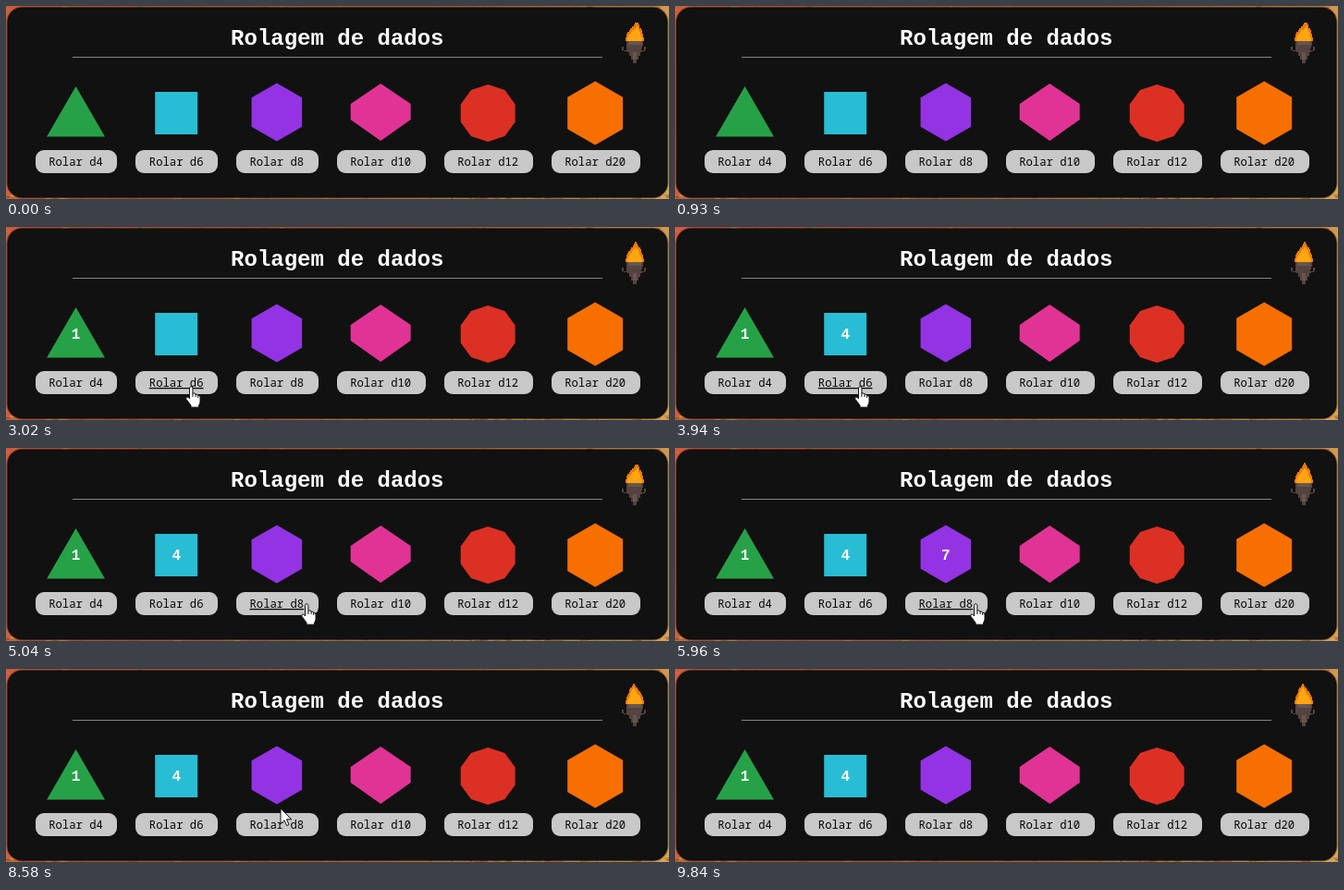
Write an HTML page that moves like this. It is 717 by 209 pixels and loops after 9900 ms.

```html
<!DOCTYPE html>
<html lang="pt-BR">
<head>
<meta charset="utf-8">
<title>Rolagem de dados</title>
<style>
  html, body { margin: 0; width: 100%; height: 100%; overflow: hidden; background: #c0583a; }
  svg { display: block; width: 717px; height: 209px; }
  text { text-anchor: middle; }
  .title, .digit { font-family: "Liberation Mono", "Courier New", monospace; font-weight: 700; fill: #fff; }
  .title { font-size: 24px; }
  .digit { font-size: 16px; }
  .label { font: 500 12.22px "Noto Sans Mono", "DejaVu Sans Mono", monospace; fill: #050505; }
  .pixel { shape-rendering: crispEdges; }
</style>
</head>
<body>
<svg viewBox="0 0 717 209">
  <defs>
    <linearGradient id="wall" x2="1" y2=".3">
      <stop offset="0" stop-color="#cf5b3e"/>
      <stop offset=".6" stop-color="#c56a3c"/>
      <stop offset="1" stop-color="#d8a356"/>
    </linearGradient>
  </defs>
  <rect width="717" height="209" fill="url(#wall)"/>
  <g id="grain"></g>
  <rect x="1.5" y="1.5" width="714" height="206" rx="16" fill="#111" stroke="#000" stroke-opacity=".35" stroke-width="2"/>
  <text class="title" x="358.3" y="42">Rolagem de dados</text>
  <path class="pixel" d="M72 55.5H645" stroke="#858585"/>
  <g id="dice"></g>
  <g class="pixel">
    <path d="M671 38h18v4l-2 6h3v-4h2v4l-6 2v4h-2v4h-2v4h-4v-4h-2v-4h-2v-4l-8-2v-4h2v4h3z" fill="#54433f"/>
    <path d="M673 38h14v4h-14zM678 50h4v8h-4z" fill="#68554f"/>
    <path id="flame" fill="#ec7a0a"/>
    <path id="core" fill="#ffa512"/>
  </g>
  <g id="cursor" stroke="#111" stroke-linejoin="round" fill="#fff">
    <path id="hand" transform="translate(-6 -1)" d="M4.5 14V2.5a1.7 1.7 0 0 1 3.4 0V8q3-.6 3.2 1.2 2.2-.4 2.6 1 2.3-.2 2.3 2v5q0 2-1.5 4v2H6v-2L1 14.5q-1-2.2 1-2.6 1 0 2.5 2ZM7.9 8v4M11.1 9v3M13.7 10v3"/>
    <path id="arrow" d="M0 0V16.5L4 12.8L6.6 18.6L9 17.5L6.5 11.8H11.8Z"/>
  </g>
</svg>
<script>
const LOOP = 9900, FADE = 300, FLICKER = 104;
const $ = id => document.getElementById(id);
const clamp = v => Math.min(1, Math.max(0, v));
const smooth = v => v * v * (3 - 2 * v);

function add(parent, tag, attrs, text = "") {
  const node = document.createElementNS("http://www.w3.org/2000/svg", tag);
  for (const key in attrs) node.setAttribute(key, attrs[key]);
  node.textContent = text;
  parent.append(node);
  return node;
}

// Speckled wall that shows around the panel
let seed = 7;
const random = () => (seed = seed * 16807 % 2147483647) / 2147483647;
for (let i = 0; i < 260; i++) {
  add($("grain"), "rect", {
    x: random() * 717, y: (i % 2) * 204 + random() * 4,
    width: 2 + random() * 8, height: 1 + random(),
    fill: `hsl(${8 + random() * 34} 58% ${34 + random() * 28}%)`, opacity: .7
  });
}

const ring = (n, r, turn = 0) => Array.from({ length: n }, (_, i) => {
  const a = (i + turn) / n * 2 * Math.PI;
  return [r * Math.sin(a), -r * Math.cos(a)];
}).join(" ");

// show / hide: when the result starts to fade in and out
const dice = [
  { sides: 4, color: "#26a148", shape: ring(3, 36.3), y: 123.3, value: 1, show: 2100 },
  { sides: 6, color: "#28bdd4", shape: ring(4, 32.5, .5), y: 116, value: 4, show: 3600 },
  { sides: 8, color: "#9333e4", shape: ring(6, 31.5), y: 115, value: 7, show: 5380, hide: 8050 },
  { sides: 10, color: "#e13396", shape: "0,-31 32.5,-9 32.5,8 0,31 -32.5,8 -32.5,-9", y: 115 },
  { sides: 12, color: "#dc3025", shape: ring(10, 31), y: 116 },
  { sides: 20, color: "#f66f00", shape: ring(6, 34.6), y: 116 }
];
let left = 31.6;
for (const die of dice) {
  const width = die.sides < 10 ? 88.66 : 96;
  const x = Math.round(left), right = Math.round(left + width);
  const mid = left + width / 2 - .4;
  add($("dice"), "polygon", { points: die.shape, fill: die.color, transform: `translate(${mid} ${die.y})` });
  if (die.value) die.digit = add($("dice"), "text", { class: "digit", x: mid, y: 121 }, die.value);
  add($("dice"), "rect", { x, y: 156, width: right - x, height: 25, rx: 9, fill: "#c8c8c8" });
  die.label = add($("dice"), "text", { class: "label", x: mid, y: 173 }, `Rolar d${die.sides}`);
  Object.assign(die, { x, right, mid });
  left += width + 20;
}

// Pointer visits: leaves the last spot at start, rests at x, y from end
const entry = { x: 142, y: 218 };
const moves = [
  { start: 860, end: 1470, x: 91, y: 169 },
  { start: 2560, end: 3020, x: 200, y: 173 },
  { start: 4110, end: 4420, x: 325, y: 169 },
  { start: 6110, end: 6890, x: 294, y: 119 },
  { start: 8300, end: 9040, x: 304, y: 218 }
];

function pointer(t) {
  let { x, y } = entry;
  for (const move of moves) {
    const p = smooth(clamp((t - move.start) / (move.end - move.start)));
    x += (move.x - x) * p;
    y += (move.y - y) * p;
  }
  return [Math.round(x), Math.round(y)];
}

// Teardrop in two-pixel rows whose tip leans sideways
function teardrop(width, height, lean) {
  let d = "";
  for (let rise = 0; rise < height; rise += 2) {
    const u = rise / height;
    const half = Math.max(1, Math.round(width * (1 - u ** 1.6)));
    const x = Math.round(680 + lean * u * u) - half;
    d += `M${x} ${36 - rise}h${half * 2}v2h${-half * 2}z`;
  }
  return d;
}

function draw(t) {
  const lean = 3 * Math.cos(Math.floor(t / FLICKER) % 4 * Math.PI / 3);
  $("flame").setAttribute("d", teardrop(10, 21 - lean / 3, lean));
  $("core").setAttribute("d", teardrop(8, 16 - lean / 3, lean));

  const [x, y] = pointer(t);
  let pointing = false;
  for (const die of dice) {
    const onButton = y >= 156 && y <= 181 && x >= die.x && x <= die.right;
    const onDie = y > 85 && y < 146 && Math.abs(x - die.mid) < 28;
    pointing = pointing || onButton || onDie;
    die.label.setAttribute("text-decoration", onButton ? "underline" : "none");
    if (!die.digit) continue;
    const fade = from => clamp((t - from) / FADE);
    die.digit.setAttribute("opacity", fade(die.show) - fade(die.hide ?? LOOP));
  }
  $("cursor").setAttribute("transform", `translate(${x} ${y})`);
  $("hand").setAttribute("visibility", pointing ? "visible" : "hidden");
  $("arrow").setAttribute("visibility", pointing ? "hidden" : "visible");
}

const start = performance.now();
function tick() {
  draw((performance.now() - start) % LOOP);
  requestAnimationFrame(tick);
}
tick();
</script>
</body>
</html>
```
